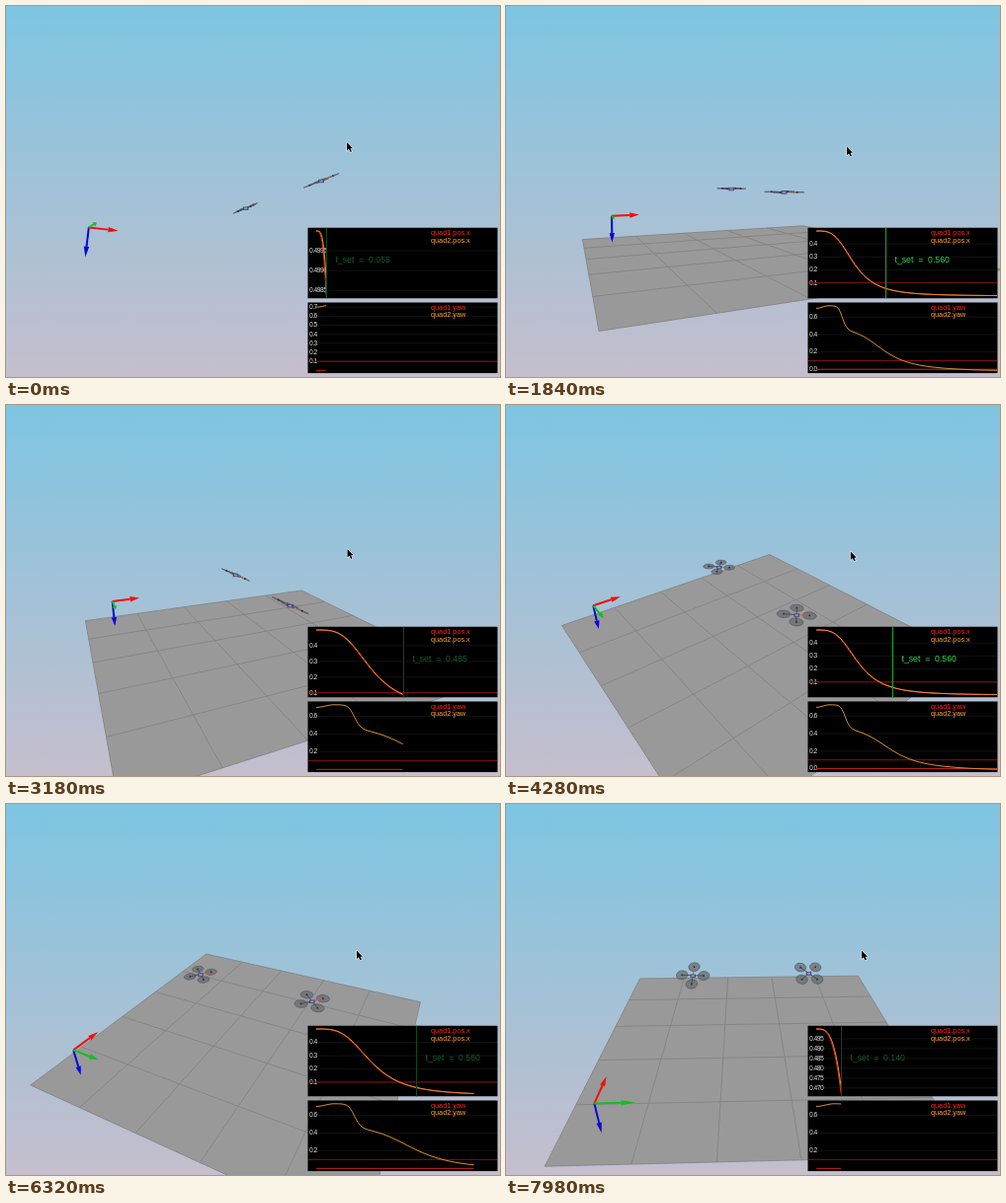
These frames come from a looping animation (500 px wide and 376 px high, 8 s). An HTML page with a canvas:

```html
<!DOCTYPE html>
<html lang="en">
<head>
<meta charset="utf-8">
<title>Two quadcopters settling</title>
<style>
  html, body { margin: 0; width: 100%; height: 100%; overflow: hidden; }
  canvas { display: block; width: 100vw; height: 100vh; }
</style>
</head>
<body>
<canvas id="stage" width="500" height="376"></canvas>
<script>
const ctx = document.getElementById('stage').getContext('2d');
const LOOP = 8000, FOCAL = 404, DISTANCE = 2.59, FLOOR = -0.394;
const FONT = '"Liberation Sans", Arial, sans-serif';
const rad = deg => deg * Math.PI / 180;
const ramp = (from, to, x) => Math.min(1, Math.max(0, (x - from) / (to - from)));
const ease = (from, to, x) => { const u = ramp(from, to, x); return u * u * (3 - 2 * u); };
const falloff = (t, half, power) => 1 / (1 + (t / half) ** power);

// Simulated flight, t in simulated seconds
const position = t => .5 * falloff(t, .306, 3.35);
const lagged = t => position(Math.max(0, t - .005));
const yaw = t => .45 * falloff(t, .543, 4.77)
  + (.25 + .03 * ease(0, .1, t)) * falloff(t, .215, 12)
  - .016 * ease(.7, 1.5, t);
const tilt = t => 28 * Math.tanh(3 * Math.cos(2 * Math.PI * t)) * falloff(t, .7, 8);

// Camera path: time, orbit, pitch
const path = [[0, 54.5, -16.5], [1840, 65.5, 2.4], [3180, 65, 16.5], [4280, 51.8, 30],
  [5080, 46.2, 29], [6320, 26, 31], [8000, -2, 27.5]];
let view;
function setView(ms) {
  const i = path.findIndex(p => p[0] > ms), from = path[i - 1], to = path[i];
  const u = ramp(from[0], to[0], ms);
  const [a, p] = [1, 2].map(n => rad(from[n] + (to[n] - from[n]) * u));
  view = { ca: Math.cos(a), sa: Math.sin(a), cp: Math.cos(p), sp: Math.sin(p) };
}
function project([x, y, z]) {
  const { ca, sa, cp, sp } = view;
  const right = x * ca + y * sa, ahead = y * ca - x * sa;
  const k = FOCAL / (DISTANCE + ahead * cp - z * sp);
  return [250 + right * k, 188 - (ahead * sp + z * cp) * k];
}

function trace(points) {
  ctx.beginPath();
  points.forEach(p => ctx.lineTo(p[0], p[1]));
}
function fill(points, color) {
  trace(points);
  ctx.closePath();
  ctx.fillStyle = color;
  ctx.fill();
}
function stroke(points, color, width = 1) {
  trace(points);
  ctx.strokeStyle = color;
  ctx.lineWidth = width;
  ctx.stroke();
}
function text(str, x, y, size, color, spacing = 0) {
  ctx.font = `${size}px ${FONT}`;
  ctx.letterSpacing = spacing + 'px';
  ctx.fillStyle = color;
  ctx.fillText(str, x, y);
}

function drawSky() {
  const sky = ctx.createLinearGradient(0, 0, 0, 376);
  sky.addColorStop(0, '#7dc5e2');
  sky.addColorStop(.5, '#a2c2d7');
  sky.addColorStop(1, '#c5becd');
  ctx.fillStyle = sky;
  ctx.fillRect(0, 0, 500, 376);
}

function drawFloor() {
  if (DISTANCE * view.sp <= FLOOR) return;
  const at = (u, v) => project([u * .4 - 1, v * .4 - 1, FLOOR]);
  fill([at(0, 0), at(0, 5), at(5, 5), at(5, 0)], '#999999');
  for (let i = 0; i <= 5; i++) {
    stroke([at(i, 0), at(i, 5)], '#808080', .8);
    stroke([at(0, i), at(5, i)], '#808080', .8);
  }
}

function drawAxes() {
  const base = [-.8, -.8, -.2];
  const along = (axis, len) => project(base.map((v, i) => v + axis[i] * len));
  const arrows = [[[0, 0, -1], '#0808d8'], [[0, 1, 0], '#f01008'], [[1, 0, 0], '#10c020']];
  for (const [axis, color] of arrows) {
    const start = along(axis, 0), neck = along(axis, .13), tip = along(axis, .2);
    const dx = tip[0] - start[0], dy = tip[1] - start[1], n = Math.hypot(dx, dy) || 1;
    const ox = -dy / n * 2.7, oy = dx / n * 2.7;
    stroke([start, neck], color, 2);
    fill([[neck[0] + ox, neck[1] + oy], tip, [neck[0] - ox, neck[1] - oy]], color);
  }
}

function drawQuad(x, y, z, heading, lean) {
  const ch = Math.cos(heading), sh = Math.sin(heading), cl = Math.cos(lean), sl = Math.sin(lean);
  const at = (u, v) => {
    const px = u * ch - v * sh, py = u * sh + v * ch;
    return project([x + px, y + py * cl, z + py * sl]);
  };
  const arm = .053, blade = .039;
  for (let k = 0; k < 4; k++) {
    const angle = Math.PI * (k / 2 + .25);
    const u = arm * Math.SQRT2 * Math.cos(angle), v = arm * Math.SQRT2 * Math.sin(angle);
    const ring = Array.from({ length: 21 }, (_, n) =>
      at(u + blade * Math.cos(n * Math.PI / 10), v + blade * Math.sin(n * Math.PI / 10)));
    fill(ring, 'rgba(100,104,110,.7)');
    stroke(ring, '#55575d', .7);
    const hub = at(u, v);
    stroke([at(0, 0), hub], k === 0 ? '#d05828' : '#484850', .9);
    ctx.fillStyle = '#282a38';
    ctx.fillRect(hub[0] - .8, hub[1] - .8, 1.6, 1.6);
  }
  const [cx, cy] = at(0, 0);
  ctx.fillStyle = '#484878';
  ctx.fillRect(cx - 2.8, cy - 1.2, 5.6, 3.4);
  ctx.fillStyle = '#9090cc';
  ctx.fillRect(cx - 1.6, cy - .4, 3.2, 1.8);
}

function tickStep(range) {
  for (let unit = 1e-5; ; unit *= 10)
    for (const m of [1, 2, 5]) if (range / (unit * m) <= 7.2) return unit * m;
}

function drawPanel({ top, high, low, curves, names, settle, marker, margin, limit }, t) {
  const scale = 183 / Math.max(1.01, t), toX = s => 314 + s * scale;
  const toY = v => top + 3.5 + 65.5 * (high - v) / (high - low);
  const bottom = top + 72, settled = t > 1.7;

  ctx.save();
  ctx.beginPath();
  ctx.rect(305.5, top, 192, 72);
  ctx.clip();
  ctx.fillStyle = '#000';
  ctx.fillRect(305, top, 193, 72);

  const step = tickStep(high - low), digits = Math.max(1, Math.ceil(-Math.log10(step) - 1e-6));
  for (let n = Math.ceil(low / step); n * step < high; n++) {
    const y = toY(n * step);
    if (y < top + margin || y > top + limit) continue;
    stroke([[314, y], [497, y]], '#121212');
    text(Math.abs(n * step).toFixed(digits), 307, y, 6.7, '#e4e4e4', -.5);
  }
  if (!settled && toY(.1) < bottom) stroke([[306, toY(.1)], [497, toY(.1)]], '#8a1010');

  for (const [fn, color] of curves) {
    const points = [];
    for (let x = 314; x < toX(t); x++) points.push([x, toY(fn((x - 314) / scale))]);
    points.push([toX(t), toY(fn(t))]);
    stroke(points, color);
  }

  if (marker) {
    const reach = Math.min(t, .56), x = Math.round(toX(reach)) + .5, bright = t > 1.06;
    stroke([[x, top], [x, bottom]], bright ? '#18a832' : '#0c4820');
    const value = (Math.round(reach * 200) / 200).toFixed(3);
    text(`t_set\u00a0\u00a0=\u00a0\u00a0${value}`, x + 9, top + 33.5, 8.7, bright ? '#28e048' : '#14602c');
  }
  if (settled) {
    const x = toX(settle), y = toY(.1);
    ctx.strokeStyle = '#20b838';
    ctx.lineWidth = 1;
    ctx.strokeRect(x, y, 497 - x, bottom - .7 - y);
  }
  text(names[0], 430, top + 5.5, 7.3, '#ff2418');
  text(names[1], 430, top + 13, 7.3, '#ffa52c');
  ctx.restore();
}

function drawPlots(t) {
  let yawHigh = .702, yawLow = 0;
  for (let s = 0; s <= t; s += .01) {
    yawHigh = Math.max(yawHigh, yaw(s));
    yawLow = Math.min(yawLow, yaw(s));
  }
  drawPanel({
    top: 224.5, high: .5, low: Math.min(.4999, position(t)), margin: 8, limit: 67.5,
    curves: [[position, '#f03018'], [lagged, '#e88c24']],
    names: ['quad1.pos.x', 'quad2.pos.x'], settle: .465, marker: true
  }, t);
  drawPanel({
    top: 300.3, high: yawHigh, low: yawLow, margin: 2, limit: 68.6,
    curves: [[() => 0, '#d02014'], [yaw, '#d89024']],
    names: ['quad1.yaw', 'quad2.yaw'], settle: .707
  }, t);
}

function drawMouse(x, y) {
  const shape = [[0, 0], [0, 8.6], [2, 6.8], [3.6, 10], [5, 9.3], [3.5, 6.2], [6, 6.2]]
    .map(p => [x + p[0], y + p[1]]);
  stroke([...shape, shape[0]], 'rgba(255,255,255,.85)', 1.2);
  fill(shape, '#000');
}

function draw(ms) {
  const t = (ms + 71) % 2624 * .00077;
  setView(ms);
  drawSky();
  drawFloor();
  drawAxes();
  const lean = rad(tilt(t));
  drawQuad(-.41, .01 + .43 * lagged(t), .006, yaw(t), lean);
  drawQuad(.395, .01 + .43 * position(t), .012, 0, lean);
  drawPlots(t);
  drawMouse(345 + 15 * ramp(3000, 8000, ms), 138 + 10.5 * ramp(0, 4200, ms));
}

ctx.textBaseline = 'middle';
ctx.lineJoin = 'round';
const begin = performance.now();
function tick() {
  draw((performance.now() - begin) % LOOP);
  requestAnimationFrame(tick);
}
tick();
</script>
</body>
</html>
```
